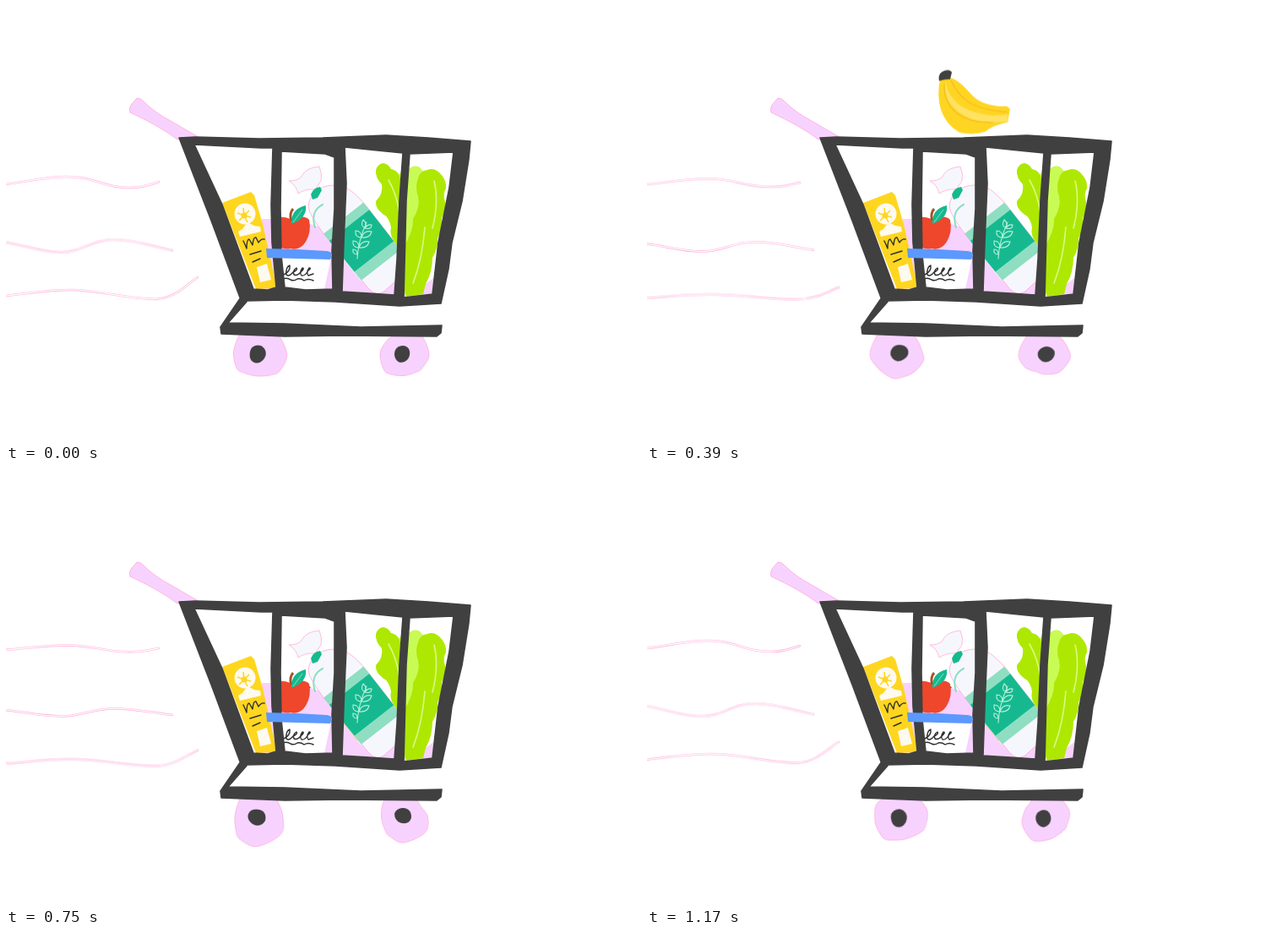
An HTML page that plays this animation: 752 by 516 pixels, repeating every 1.2 s.

```html
<!DOCTYPE html>
<html lang="en">
<head>
<meta charset="utf-8">
<title>Shopping cart</title>
<style>
  html, body { margin: 0; width: 100%; height: 100%; overflow: hidden; background: #fff; }
  svg { display: block; width: 752px; height: 516px; }

  .ink { fill: #404040; }
  .frame { stroke: #404040; stroke-width: 1.6; stroke-linejoin: round; }
  .lilac { fill: #f8d2ff; }
  .halo { stroke: #ffa3d6; stroke-width: .7; }
  .pen { fill: none; stroke: #303030; stroke-width: 1.4; stroke-linecap: round; stroke-linejoin: round; }

  defs path { vector-effect: non-scaling-stroke; }
  .wind { fill: none; stroke-linecap: round; animation: wave 1.2s linear infinite; }
  .edge { stroke: #ffabd6; stroke-width: 2.5; }
  .core { stroke: #fff; stroke-width: 1.3; }
  .low { animation-name: wave-low; }

  .cart { animation: bump 1.2s ease-in-out infinite; }
  .banana { animation: drop 1.2s linear infinite; }
  .wheel { animation: roll .6s linear infinite; }

  @keyframes roll { to { transform: rotate(360deg); } }
  @keyframes bump {
    0%, 65%, 85%, 100% { transform: none; }
    75% { transform: translateY(4px); }
  }
  @keyframes drop {
    0% { transform: translateY(-219px); }
    20% { transform: translateY(-86px); }
    32.5% { transform: none; }
    42.5% { transform: translateY(74px); }
    57%, 100% { transform: translateY(180px); }
  }
  @keyframes wave {
    0%, 100% { transform: scaleY(1); }
    20% { transform: translateY(.5px) scaleY(.55); }
    32.5% { transform: translateY(1px) scaleY(.75); }
    42.5% { transform: translateY(2px) scaleY(1); }
    62.5% { transform: translateY(3px) scaleY(.6); }
    75% { transform: translateY(1.5px) scaleY(.7); }
    97.5% { transform: scaleY(1); }
  }
  @keyframes wave-low {
    0%, 100% { transform: scaleY(1); }
    20% { transform: translateY(3px) scaleY(.65); }
    32.5% { transform: translateY(4px) scaleY(.55); }
    42.5% { transform: translateY(4.5px) scaleY(.65); }
    62.5% { transform: translateY(5.5px) scaleY(.72); }
    75% { transform: translateY(4px) scaleY(.55); }
    97.5% { transform: scaleY(.95); }
  }
</style>
</head>
<body>
<svg viewBox="0 0 752 516">
  <defs>
    <path id="w1" d="M0 3C25 0 45-6 72-6C105-6 115 7 147 7C160 7 170 4 181 0"/>
    <path id="w2" d="M0-4C25 0 40 8 66 8C90 8 100-7 128-7C155-7 175 2 197 5.500"/>
    <path id="w3" d="M0 4C28 1 48-3 76-3C115-3 140 8 178 8C200 7 212-8 227-18"/>
  </defs>

  <!-- wind -->
  <g transform="translate(0 208)"><g class="wind"><use href="#w1" class="edge"/><use href="#w1" class="core"/></g></g>
  <g transform="translate(0 283.500)"><g class="wind"><use href="#w2" class="edge"/><use href="#w2" class="core"/></g></g>
  <g transform="translate(0 339)"><g class="wind low"><use href="#w3" class="edge"/><use href="#w3" class="core"/></g></g>

  <!-- wheels -->
  <g transform="translate(298 411)"><g class="wheel">
    <path id="rear" class="lilac halo"/>
    <path class="ink" d="M-9-2C-8-8-2-11 4-9C9-6 11-1 9 4C6 10 1 13-4 11C-9 9-10 4-9-2Z"/>
  </g></g>
  <g transform="translate(471 411)"><g class="wheel">
    <path id="front" class="lilac halo"/>
    <path class="ink" d="M-11 1C-11-5-7-9-1-9C5-9 8-4 7 2C6 8 1 11-4 11C-8 10-11 6-11 1Z"/>
  </g></g>

  <g class="cart">
    <path class="lilac halo" d="M155 109Q160 109 163 113Q176 126 195 136L226 154L203 158Q180 141 147 126Q145 122 148 117Z"/>

    <g class="banana">
      <path fill="#ffd523" d="M347 87Q343 106 348 122Q354 140 370 149Q386 153 401 148Q408 141 427 137L430 121L426 118Q400 119 386 106C376 95 368 86 358 84Z"/>
      <path fill="#ffe262" d="M354 88C356 111 375 126 410 129L427 128L428 136Q405 139 384 133C362 124 350 108 354 88Z"/>
      <path fill="none" stroke="#f6bd1c" stroke-width="1.200" d="M352 92C351 122 375 139 410 137M360 87C370 110 385 122 427 125"/>
      <path class="ink" d="M346 88Q344 79 352 76Q359 74 361 78L359 86Q352 86 346 88Z"/>
    </g>

    <path class="lilac" d="M303 252L320 252L352 255L372 262L400 300L420 325L462 322L495 330L512 318L510 346L300 344Z"/>

    <!-- juice box -->
    <path fill="#ffd61f" d="M256 233L290 220L294 224L304 258L320 330L317 334L296 335Z"/>
    <g fill="#fffaf0">
      <circle cx="283" cy="246" r="12.500"/>
      <path d="M275 267L280 264L286 256L294 260L301 261L302 267L277 273Z"/>
      <path d="M297 309L309 305L314 324L301 327Z"/>
    </g>
    <circle cx="282" cy="248" r="3.500" fill="#ffd61f"/>
    <path stroke="#ffd61f" stroke-width="1.600" d="M282 248L281 239M282 248L288 242M282 248L290 250M282 248L274 245M282 248L276 254M282 248L286 256"/>
    <path class="pen" d="M281 278Q283 282 285 287Q285 276 288 276L292 283Q293 273 296 274L299 280Q302 275 306 276M289 294L302 290M292 303L301 299"/>

    <!-- bread bag -->
    <path fill="#f6f7fc" class="halo" d="M335 207Q345 207 350 202C354 193 363 191 371 190Q375 199 373 207L366 217Q355 216 346 222Q344 212 335 207Z"/>
    <g transform="translate(367 222) rotate(-38)">
      <path fill="#f6f7fc" class="halo" d="M0-2C14-3 30 6 35 24Q38 36 38 54L38 124Q35 138 22 139L-8 141Q-19 140-20 128L-22 50Q-22 25-19 12Q-15 0 0-2Z"/>
      <path fill="#8fdec2" d="M-22 43L38 43L38 114L-21 114Z"/>
      <path fill="#16b98f" d="M-22 54L38 54L38 101L-21 101Z"/>
    </g>
    <path fill="#16b98f" d="M361 223Q364 215 372 214L374 218L369 227L363 229Z"/>
    <path fill="none" stroke="#8fdec2" stroke-width="2.200" stroke-linecap="round" d="M366 262C362 250 365 240 375 235"/>
    <g fill="none" stroke="#b5f0dc" stroke-width="1.100" stroke-linecap="round">
      <path d="M416 299Q417 278 427 256"/>
      <path id="leaf" d="M418 286Q410 286 411 278Q418 278 418 286Q428 287 430 279Q421 277 418 286"/>
      <use href="#leaf" x="3" y="-12"/>
      <path d="M416 294Q410 294 411 288Q416 288 416 294M425 263Q419 260 423 253Q428 257 425 263Q433 265 433 259Q428 258 425 263"/>
    </g>

    <!-- lettuce -->
    <path fill="#c9fb55" d="M464 202Q470 190 478 192Q484 187 490 191L497 199L494 270L468 300L462 230Z"/>
    <path fill="#aee802" d="M438 194Q441 186 447 186Q453 187 456 193Q463 194 466 201L472 220L474 335L470 320L464 284Q453 272 456 262Q454 250 446 246Q437 239 438 231Q447 222 445 211Q437 203 438 194Z"/>
    <path fill="#aee802" d="M488 204Q490 195 499 194Q507 191 514 198Q522 206 521 216Q517 222 520 232Q521 243 516 251Q518 263 511 275Q512 286 505 298Q505 315 497 329L494 341L474 344Q469 334 470 315L471 285Q483 266 482 252Q491 238 488 225Q484 214 488 204Z"/>
    <path fill="none" stroke="#dcf987" stroke-width="1.600" stroke-linecap="round" d="M453 206Q463 223 466 246M507 207Q513 232 505 263M496 262Q493 300 482 328"/>

    <!-- apple -->
    <path fill="#ef472b" d="M316 253Q323 247 337 252Q352 246 359 253Q362 267 355 279Q348 290 337 287Q325 290 320 278Q314 265 316 253Z"/>
    <path fill="none" stroke="#a5512a" stroke-width="3" d="M338 254Q335 246 340 240"/>
    <path fill="#16b98f" d="M338 258Q337 240 355 236Q357 251 338 258Z"/>
    <path fill="none" stroke="#8fdec2" stroke-width="1" d="M340 256L351 241"/>

    <!-- tub -->
    <path fill="#fff" d="M322 297L385 298L377 335L327 335Z"/>
    <path class="pen" d="M329 318Q337 314 336 307Q331 309 332 318Q335 321 340 315Q346 312 344 310Q339 313 341 318Q345 320 350 314Q354 310 351 310Q347 316 350 319Q354 320 358 313Q362 310 359 310Q355 316 358 319L364 317M328 323Q333 321 337 324Q341 326 345 323Q349 322 353 325Q358 322 364 325"/>

    <!-- basket and base -->
    <path class="ink frame" fill-rule="evenodd" d="M205 156L225 155L300 157L375 156L450 153L500 156L550 160L548 181L540 231L528 280L524 311L515 352L466 355L390 350L330 348L285 349L277 345L243 254Z
      M223 164L256 235L293 335L310 336L320 333L315 280L314 235L316 168L302 168Z
      M326 172L325 240L326 295L330 333L355 336L387 335L386 290L389 240L389 179L378 175Z
      M401 167L403 210L400 280L398 338L430 340L460 342L463 300L466 230L470 174L440 171Z
      M478 175L474 230L471 345L505 341L512 280L525 215L530 173Z"/>
    <path class="ink frame" d="M254 380L278 345L285 350L263 375L330 376L420 380L516 378L515 387L510 391L400 390L330 391L255 388Z"/>

    <!-- tub lid -->
    <path fill="#5b99ff" d="M308 287L345 288L380 290Q387 291 386 296L384 300L345 299L309 298Z"/>
  </g>
</svg>
<script>
  const angles = [0, 36, 54, 90, 126, 144, 180, 216, 234, 270, 306];

  // Smooth closed outline through polar points
  function blob(radii) {
    const n = radii.length;
    const pts = radii.map((r, i) => {
      const a = angles[i] * Math.PI / 180;
      return [r * Math.cos(a), r * Math.sin(a)];
    });
    const at = i => pts[(i + n) % n];
    const mix = (p, a, b) => p.map((v, k) => (v + (b[k] - a[k]) / 6).toFixed(2));
    let d = 'M' + pts[0];
    for (let i = 0; i < n; i++) {
      d += 'C' + [mix(at(i), at(i - 1), at(i + 1)), mix(at(i + 1), at(i + 2), at(i)), at(i + 1)].join(' ');
    }
    return d + 'Z';
  }

  document.getElementById('rear').setAttribute('d',
    blob([34.5, 33.5, 31, 27, 28.5, 30.5, 28.5, 29.5, 30, 30, 34]));
  document.getElementById('front').setAttribute('d',
    blob([30, 28, 27, 26.5, 30, 30, 28, 25, 24, 28.5, 31]));
</script>
</body>
</html>
```
